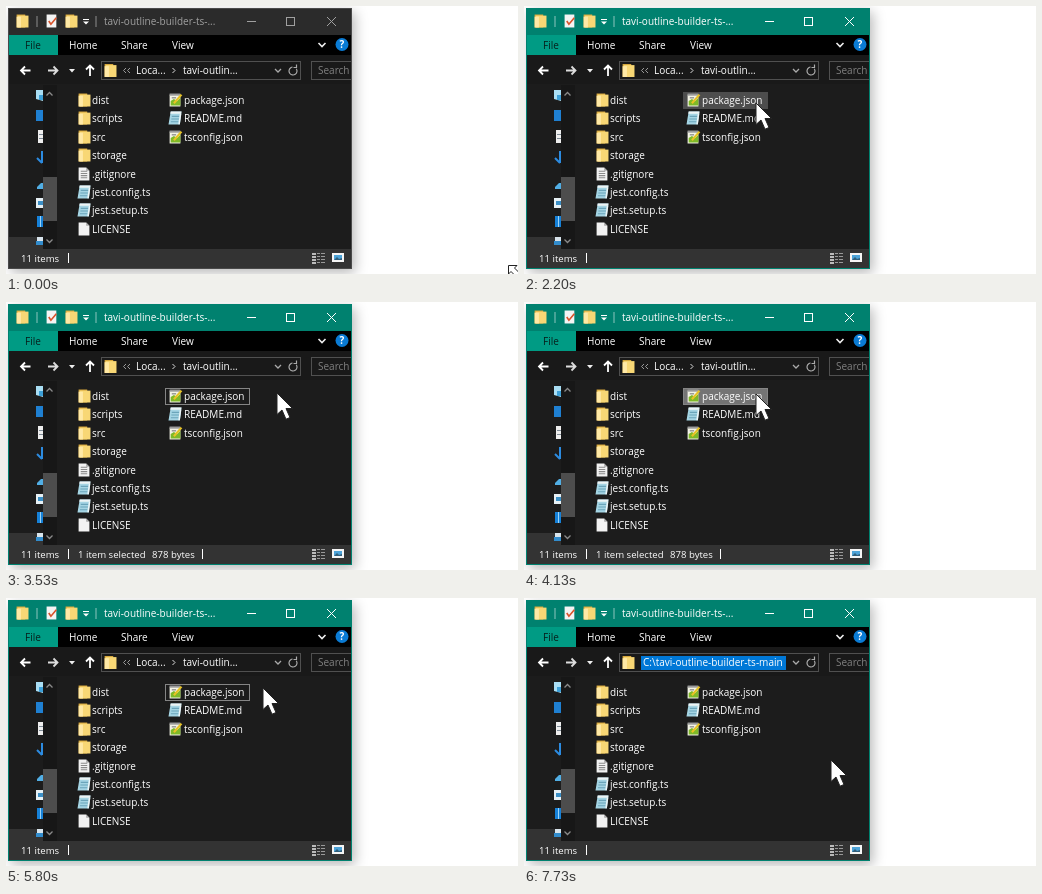
These frames come from a looping animation (512 by 268 pixels, 8000 ms). An HTML page with a canvas:

```html
<!DOCTYPE html>
<html lang="en">
<head>
<meta charset="utf-8">
<style>
html, body { margin: 0; width: 100%; height: 100%; overflow: hidden; background: #fff; }
canvas { display: block; width: 512px; height: 268px; }
</style>
</head>
<body>
<canvas id="stage"></canvas>
<script>
const canvas = document.getElementById('stage');
const scale = window.devicePixelRatio || 1;
canvas.width = 512 * scale;
canvas.height = 268 * scale;
const ctx = canvas.getContext('2d');

const LOOP = 8000;
const TICK = 200 / 3;
const PROJECT = 'tavi-outline-builder-ts';

// Pointer path: time, x, y
const POINTER = [
  [700, 502, 259], [1420, 262, 179],
  [1640, 262, 179], [2200, 232, 97], [2400, 232, 93],
  [2670, 232, 93], [3130, 269, 91], [3260, 271, 91],
  [3530, 271, 91], [3930, 232, 92],
  [4135, 232, 92], [4330, 289, 93], [4400, 291, 93],
  [5500, 291, 93], [5600, 289, 96], [5800, 257, 90], [6260, 246, 62],
  [6370, 246, 62], [6530, 247, 63],
  [7150, 247, 63], [7730, 307, 162]
];

function pointerAt(t) {
  const next = POINTER.findIndex(p => p[0] > t);
  if (next === 0) return POINTER[0].slice(1);
  if (next < 0) return POINTER.at(-1).slice(1);
  const [t0, x0, y0] = POINTER[next - 1], [t1, x1, y1] = POINTER[next];
  const u = (t - t0) / (t1 - t0), e = u * u * (3 - 2 * u);
  return [x0 + (x1 - x0) * e, y0 + (y1 - y0) * e];
}

const within = (t, from, to) => t >= from && t < to;

function rect(x, y, w, h, color) {
  ctx.fillStyle = color;
  ctx.fillRect(x, y, w, h);
}

function frame(x, y, w, h, color) {
  ctx.strokeStyle = color;
  ctx.lineWidth = 1;
  ctx.strokeRect(x + .5, y + .5, w - 1, h - 1);
}

function text(str, x, y, color = '#fff', size = 10, weight = 500) {
  ctx.font = `${weight} ${size}px "Open Sans", "Noto Sans", sans-serif`;
  ctx.fillStyle = color;
  ctx.fillText(str, x, y);
}

function stroke(d, color = '#fff', width = 1) {
  ctx.strokeStyle = color;
  ctx.lineWidth = width;
  ctx.stroke(new Path2D(d));
}

function fill(d, color) {
  ctx.fillStyle = color;
  ctx.fill(new Path2D(d));
}

// Icons are drawn around their centre
const icons = {
  folder() {
    rect(-5, -6, 8, 12, '#d9a93c');
    rect(-4, -5, 10, 11, '#f8d775');
    rect(-5, -4, 4, 10, '#ffe9a6');
  },
  page() {
    fill('M-5-6H2L5-3V6H-5Z', '#f2f2f2');
    fill('M2-6V-3H5Z', '#a8a8a8');
  },
  lines() {
    icons.page();
    stroke('M-3-2.5H3M-3-.5H3M-3 1.5H3M-3 3.5H3', '#8a8a8a');
  },
  note() {
    fill('M-4-6H6L4.5 6H-6Z', '#a5d5e4');
    fill('M-4-6H6L5.7-4H-4.3Z', '#eef4f5');
    stroke('M-3-1.5H4M-3.4 1H3.6M-3.8 3.5H3.2', '#6ba5ba');
    stroke('M5.2-4L3.8 5.8', '#eef6f8', 1.4);
  },
  json() {
    rect(-5, -5, 10, 11, '#f3f3e6');
    rect(-5, -6, 10, 2, '#9a9a9a');
    fill('M-4 5V1L-1-1L2 1L5-2V5Z', '#7fb928');
    stroke('M-1 3L6-5', '#e8c325', 2);
    stroke('M-3-2H1', '#777');
  },
  check() {
    rect(-5, -6, 9, 12, '#f4f4f4');
    stroke('M-3 0L-1 3L4-3', '#d9532c', 1.5);
  }
};

function icon(name, x, y) {
  ctx.save();
  ctx.translate(x, y);
  ctx.scale(1.08, 1.08);
  icons[name]();
  ctx.restore();
}

function drawTitle(active) {
  const ink = active ? '#fff' : '#a0a0a0';
  rect(3, 3, 342, 26, active ? '#00816f' : '#2b2b2b');
  icon('folder', 16, 15);
  icon('check', 46, 15);
  icon('folder', 65, 15);
  const divider = active ? '#46a396' : '#5c5c5c';
  rect(30, 10, 2, 11, divider);
  rect(89, 10, 2, 11, divider);
  stroke('M77 13.5H83', '#fff');
  fill('M77 15.5H83L80 18.5Z', '#fff');
  text(PROJECT + '-...', 98, 19, ink);
  stroke('M241 15.5H250M321 11L330 20M330 11L321 20', ink);
  frame(280, 11, 9, 9, ink);
}

function drawTabs() {
  rect(3, 29, 342, 20, '#000');
  rect(3, 29, 49, 20, '#009b84');
  text('File', 19, 43, '#06211d');
  text('Home', 63, 43);
  text('Share', 115, 43);
  text('View', 166, 43);
  stroke('M312.5 37L316 40.5L319.5 37', '#eee', 1.6);
  ctx.fillStyle = '#0a7bd4';
  ctx.beginPath();
  ctx.arc(336, 38.5, 6.5, 0, 7);
  ctx.fill();
  text('?', 333.6, 42.3, '#fff', 10, 700);
}

function drawAddress(editing) {
  rect(3, 49, 342, 29, '#191919');
  stroke('M24.5 64.5H15M19 60.5L15 64.5L19 68.5', '#fff', 1.8);
  stroke('M42 64.5H51.5M47.5 60.5L51.5 64.5L47.5 68.5', '#ddd', 1.8);
  fill('M63 63H69L66 66.5Z', '#eee');
  stroke('M84 70V60M80 63.5L84 59.5L88 63.5', '#fff', 1.8);
  frame(95, 55, 200, 19, '#505050');
  icon('folder', 104, 64.5);
  if (editing) {
    rect(117, 58, 145, 14, '#0078d7');
    text(`C:\\${PROJECT}-main`, 119, 68);
  } else {
    stroke('M120 62L117.5 64.5L120 67M124 62L121.5 64.5L124 67', '#999');
    text('Loca...', 130, 68);
    stroke('M166.5 62L169 64.5L166.5 67', '#ddd');
    text('tavi-outlin...', 177, 68);
  }
  stroke('M269 63L272 66L275 63', '#aaa', 1.3);
  ctx.strokeStyle = '#aaa';
  ctx.lineWidth = 1.2;
  ctx.beginPath();
  ctx.arc(287, 65, 4, -.6, 4.6);
  ctx.stroke();
  stroke('M287.5 61.5H290.5V58.5', '#aaa', 1.2);
  frame(305, 55, 42, 19, '#505050');
  text('Search', 312, 68, '#808080');
}

function drawSidebar() {
  rect(3, 231, 34, 12, '#333');
  fill('M30 84H37V95L30 93Z', '#a9def4');
  rect(33, 89, 4, 5, '#3da0d8');
  rect(30, 104, 7, 11, '#1f80d2');
  rect(32, 124, 5, 13, '#eee');
  stroke('M33 128.5H37M33 132.5H37', '#7d8a96');
  stroke('M36 145V157M31 152L36 157', '#2c8be0', 2);
  fill('M31 181L35 177H37V183H31Z', '#51aee4');
  rect(30, 192, 7, 10, '#e6f0f5');
  rect(32, 195, 5, 4, '#3b8fc6');
  rect(31, 210, 6, 11, '#1681d8');
  rect(34, 210, 1, 11, '#9bd2f5');
  rect(31, 231, 6, 4, '#d8e4ec');
  rect(30, 235, 7, 4, '#328ccc');
  rect(37, 79, 14, 164, '#171717');
  rect(37, 171, 14, 44, '#4d4d4d');
  stroke('M40.5 89.5L43.5 86.5L46.5 89.5M40.5 233.5L43.5 236.5L46.5 233.5', '#8a8a8a', 1.3);
}

const COLUMNS = [
  [72, [['folder', 'dist'], ['folder', 'scripts'], ['folder', 'src'], ['folder', 'storage'],
    ['lines', '.gitignore'], ['note', 'jest.config.ts'], ['note', 'jest.setup.ts'], ['page', 'LICENSE']]],
  [163, [['json', 'package.json'], ['note', 'README.md'], ['json', 'tsconfig.json']]]
];

function drawFiles({ hover, selected, focused }) {
  if (selected) rect(159, 86, 85, 17, '#747474');
  else if (hover) rect(159, 86, 85, 17, '#4d4d4d');
  if (focused) frame(159, 86, 85, 17, '#858585');
  for (const [x, files] of COLUMNS) {
    files.forEach(([kind, name], i) => {
      const y = 94 + i * 18.4;
      icon(kind, x + 6, Math.round(y));
      text(name, x + (x < 100 ? 14 : 15), Math.round(y + 4));
    });
  }
}

function drawStatus(showSelection) {
  rect(3, 243, 342, 19, '#333');
  text('11 items', 15, 256, '#fff', 9.6);
  rect(62, 247, 1, 10, '#fff');
  if (showSelection) {
    text('1 item selected', 72, 256, '#fff', 9.6);
    text('878 bytes', 146, 256, '#fff', 9.6);
    rect(196, 247, 1, 10, '#fff');
  }
  for (let y = 247; y < 257; y += 3) {
    rect(306, y, 4, 2, '#bbb');
    rect(311, y, 3, 1, '#999');
    rect(315, y, 4, 1, '#999');
  }
  rect(326, 247, 12, 9, '#f5f5f5');
  rect(328, 249, 8, 5, '#4da3d8');
  fill('M328 254L331 251L333 253L336 252V254Z', '#315f7c');
}

const SHAPES = {
  arrow: 'M0 0V21.5L5 17L9 26.2L13 24.5L9 15.5H15.5Z',
  resize: 'M.5 .5H9L6.5 3L16 12.5L12.5 16L3 6.5L.5 9Z'
};

function drawPointer(x, y, shape) {
  if (shape === 'caret') {
    stroke('M245.5 55.5H249.5M247.5 55.5V71.5M245.5 71.5H249.5', '#fff');
    return;
  }
  ctx.save();
  ctx.translate(x, y);
  fill(SHAPES[shape], '#fff');
  stroke(SHAPES[shape], '#222');
  ctx.restore();
}

function draw(t) {
  const [x, y] = pointerAt(t);
  const active = t >= 1520;
  const editing = t >= 6790;
  const selected = within(t, 2590, 3520) || within(t, 3990, 4920);
  const hover = x >= 159 && x < 244 && y >= 86 && y < 103;
  const shape = t < 720 ? 'resize' : editing && y < 75 ? 'caret' : 'arrow';

  ctx.setTransform(scale, 0, 0, scale, 0, 0);
  rect(0, 0, 512, 268, '#fff');
  ctx.save();
  ctx.shadowColor = 'rgba(0,0,0,.28)';
  ctx.shadowBlur = 12 * scale;
  ctx.shadowOffsetX = 3 * scale;
  ctx.shadowOffsetY = 4 * scale;
  rect(2, 2, 344, 261, active ? '#00816f' : '#4a4a4a');
  ctx.restore();

  ctx.save();
  ctx.beginPath();
  ctx.rect(3, 3, 342, 259);
  ctx.clip();
  rect(3, 3, 342, 259, '#1c1c1c');
  drawTitle(active);
  drawTabs();
  drawAddress(editing);
  drawSidebar();
  drawFiles({ hover, selected, focused: t >= 2590 && !editing && (!selected || hover) });
  drawStatus(within(t, 2590, 3590) || within(t, 3990, 4920));
  ctx.restore();
  drawPointer(x, y, shape);
}

function play(now) {
  draw(Math.floor((now % LOOP + 4) / TICK) * TICK);
  requestAnimationFrame(play);
}
requestAnimationFrame(play);
</script>
</body>
</html>
```
